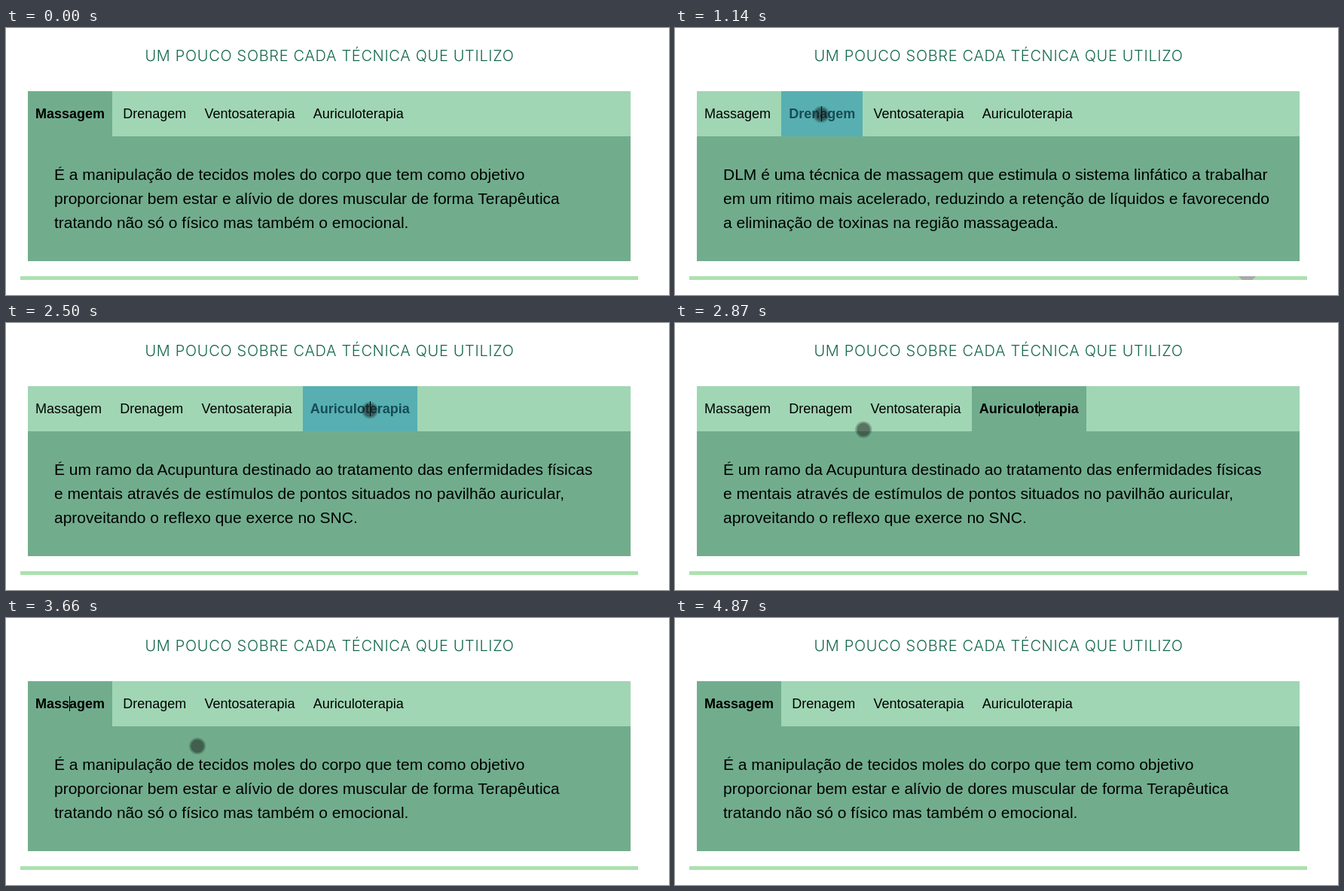
Animation of 880x355 px, one loop 4.93 s. Source, as an HTML page:

```html
<!DOCTYPE html>
<html lang="pt-BR">
<head>
<meta charset="utf-8">
<title>Técnicas</title>
<style>
  html, body { margin: 0; width: 100%; height: 100%; overflow: hidden; background: #fff; }
  #stage { position: relative; width: 880px; height: 355px; overflow: hidden; color: #000; font-family: "Liberation Sans", Arial, sans-serif; }
  h1, h2 { margin: 0; color: #14684b; font: 350 20px/30px Inter, sans-serif; letter-spacing: .66px; text-align: center; }
  h1 { position: absolute; left: 0; top: 22px; width: 859px; }
  h2 { margin: 28px 0 0; font-weight: 500; letter-spacing: 1.2px; }
  main { position: absolute; left: 19px; top: 84px; width: 820px; }
  nav { display: flex; gap: 4.2px; height: 60px; margin: 0 10px; background: #a0d6b4; font-size: 18px; line-height: 60px; }
  nav span { padding: 0 10px; }
  nav .active { background: #71ad8d; font-weight: bold; }
  nav .hover { background: #57afb1; color: #164c55; }
  #panel { margin: 0 10px; padding: 35px; background: #71ad8d; font-size: 21px; line-height: 32px; white-space: pre; }
  #rule { height: 5px; margin-top: 20px; background: #ace1af; }
  #caret, #trace, #pointer { position: absolute; }
  #caret { top: 104px; width: 1px; height: 20px; background: #000; }
  #trace { left: 748px; top: 330px; width: 23px; height: 5px; background: #aaa; clip-path: polygon(0 0, 100% 0, 80% 100%, 20% 100%); }
  #pointer { left: -9px; top: -9px; width: 18px; height: 18px; border-radius: 50%; background: rgba(17,17,17,.5); box-shadow: 0 0 0 2px rgba(17,17,17,.24); }
</style>
</head>
<body>
<div id="stage">
  <h1>UM POUCO SOBRE CADA TÉCNICA QUE UTILIZO</h1>
  <main>
    <nav><span>Massagem</span><span>Drenagem</span><span>Ventosaterapia</span><span>Auriculoterapia</span></nav>
    <div id="panel"></div>
    <div id="rule"></div>
    <h2>CONTATO</h2>
  </main>
  <div id="trace"></div>
  <div id="caret"></div>
  <div id="pointer"></div>
</div>
<script>
const LOOP = 4930, BLINK = 525;
const MASSAGE = 0, DRAINAGE = 1, CUPPING = 2, EAR = 3;

const texts = [
  'É a manipulação de tecidos moles do corpo que tem como objetivo\nproporcionar bem estar e alívio de dores muscular de forma Terapêutica\ntratando não só o físico mas também o emocional.',
  'DLM é uma técnica de massagem que estimula o sistema linfático a trabalhar\nem um ritimo mais acelerado, reduzindo a retenção de líquidos e favorecendo\na eliminação de toxinas na região massageada.',
  'É uma técnica de sucção da pele que promove um aumento da circulação\nsanguínea com o objetivo de melhorar dores e disfunções.',
  'É um ramo da Acupuntura destinado ao tratamento das enfermidades físicas\ne mentais através de estímulos de pontos situados no pavilhão auricular,\naproveitando o reflexo que exerce no SNC.'
];

// Clicks: time, tab, caret x
const clicks = [[1040, DRAINAGE, 194], [1840, CUPPING, 297], [2400, EAR, 483], [3295, MASSAGE, 84]];
// Hovers: tab, start, end
const hovers = [[DRAINAGE, 840, 1650], [CUPPING, 1670, 2200], [EAR, 2220, 2690], [MASSAGE, 3270, 3540]];
// Pointer path: time, x, y
const path = [
  [170, 759, 326], [550, 355, 244], [680, 237, 209], [740, 222, 185], [860, 200, 132], [960, 194, 115],
  [1560, 194, 115], [1760, 298, 126], [2080, 298, 126], [2320, 483, 116], [2660, 483, 116],
  [2870, 251, 142], [3060, 100, 118], [3150, 87, 115], [3440, 87, 115], [3660, 253, 170],
  [3770, 370, 206], [4110, 841, 346]
];

const el = id => document.getElementById(id);
const tabs = [...document.querySelectorAll('nav span')];
const show = (node, on) => { node.style.visibility = on ? 'visible' : 'hidden'; };

function pointerAt(t) {
  const i = path.findIndex(p => p[0] > t);
  if (i < 1) return null;
  const [t0, x0, y0] = path[i - 1], [t1, x1, y1] = path[i];
  const k = (t - t0) / (t1 - t0);
  return [x0 + (x1 - x0) * k, y0 + (y1 - y0) * k];
}

let shown = -1;
function draw(now) {
  const t = now % LOOP;
  const click = clicks.filter(c => c[0] <= t).pop();
  const active = click ? click[1] : MASSAGE;
  const hover = hovers.find(h => t >= h[1] && t < h[2]);

  tabs.forEach((tab, i) => {
    tab.classList.toggle('active', i === active);
    tab.classList.toggle('hover', !!hover && hover[0] === i);
  });
  if (active !== shown) el('panel').textContent = texts[shown = active];

  show(el('caret'), click && (t - click[0]) % (2 * BLINK) < BLINK);
  if (click) el('caret').style.left = click[2] + 'px';

  show(el('trace'), t >= 210 && t < 1840);

  const pos = pointerAt(t);
  show(el('pointer'), pos);
  if (pos) el('pointer').style.transform = `translate(${pos[0]}px, ${pos[1]}px)`;
  requestAnimationFrame(draw);
}
draw(0);
</script>
</body>
</html>
```
